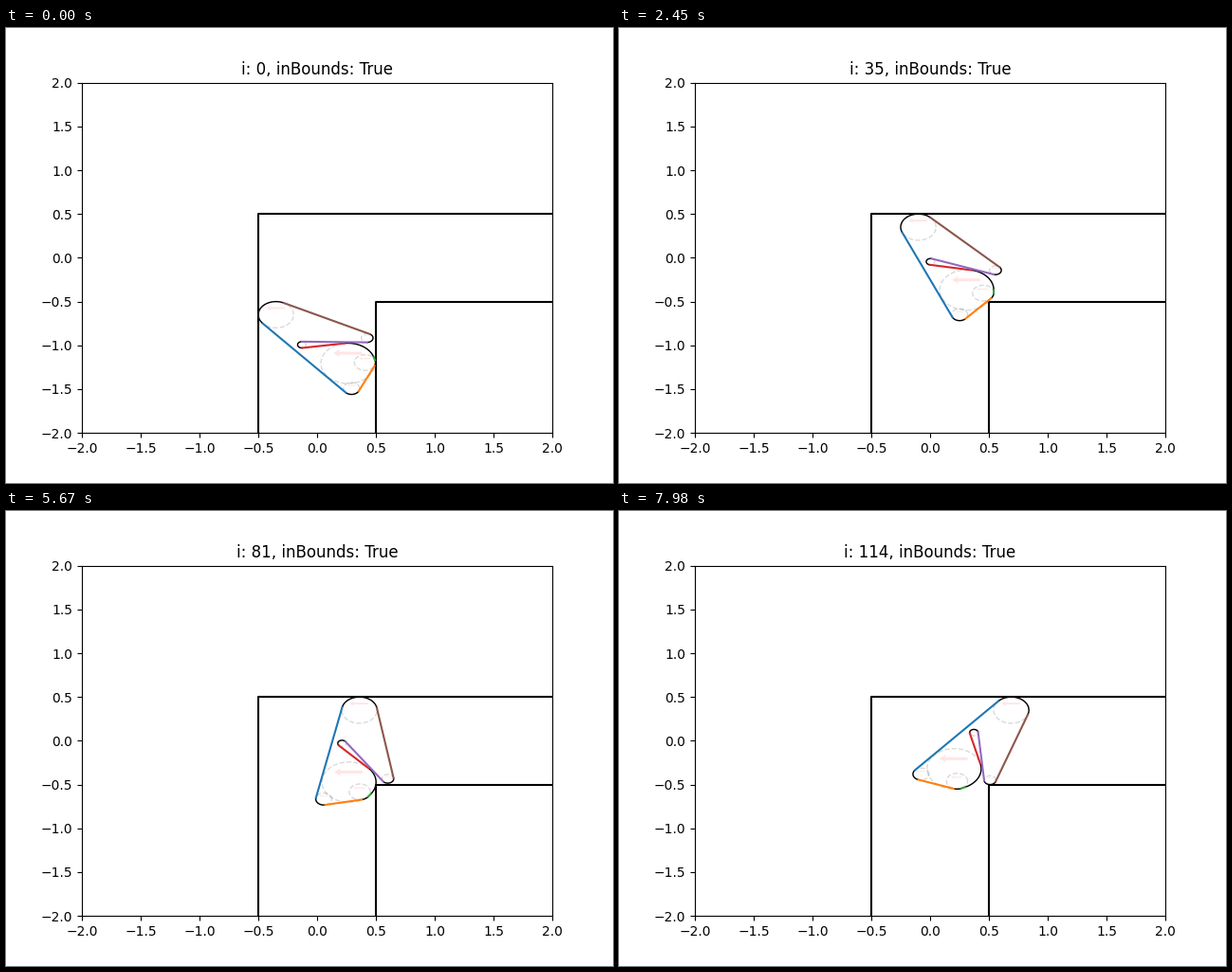
Recreate the animation shown at these times as a matplotlib script. Size 640 by 480 pixels, loop 8000 ms.

```python
import numpy as np
import matplotlib.pyplot as plt
from matplotlib.animation import FuncAnimation
from matplotlib.collections import LineCollection, PolyCollection

LOOP, STEP, HOLD = 8000, 20, 70
POSES = (LOOP - 1) // HOLD + 1
CORNER = np.array([0.5, -0.5])

# Discs relative to the first one; a negative radius turns the belt inwards.
DISCS = np.array([[0, 0], [0.643, -0.842], [0.757, -0.546],
                  [0.613, -0.555], [0.2204, -0.3433], [0.7758, -0.2656]])
RADII = np.array([0.15, 0.068, 0.09, 0.23, -0.036, 0.05])
COUNT = len(RADII)

# Left-pointing arrow for a disc of radius 1
ARROW = np.array([[0.5, 0.57], [-0.32, 0.57], [-0.32, 0.68], [-0.55, 0.5],
                  [-0.32, 0.32], [-0.32, 0.43], [0.5, 0.43]])
TURN = np.linspace(0, 2 * np.pi, 61)


def on_circle(angle):
    return np.column_stack([np.cos(angle), np.sin(angle)])


def place(pos, angle):
    c, s = np.cos(angle), np.sin(angle)
    return DISCS @ np.array([[c, s], [-s, c]]) + pos


def tangents(centers):
    """Start, end and outward normal of each straight side of the belt."""
    sides = []
    for k in range(COUNT):
        j = (k + 1) % COUNT
        d = centers[j] - centers[k]
        length = np.hypot(*d)
        u = d / length
        right = np.array([u[1], -u[0]])
        a = (RADII[k] - RADII[j]) / length
        n = a * u + np.sqrt(1 - a * a) * right
        sides.append((centers[k] + RADII[k] * n, centers[j] + RADII[j] * n, n))
    return sides


def in_bounds(centers):
    for (x, y), r in zip(centers, RADII):
        if r > 0 and np.hypot(max(0.5 - x, 0), max(y + 0.5, 0)) < r - 1e-9:
            return False
    for p, q, n in tangents(centers):
        along = (CORNER - p) @ (q - p)
        if 0 <= along <= (q - p) @ (q - p) and -0.1 < (CORNER - p) @ n < 0:
            return False
    return True


def plan():
    """Go up, then slide right, turning only as far as the corner demands."""
    poses, angle = [], 0.0
    for i in range(POSES):
        pos = np.array([-0.35 + 0.01 * max(0, i - 10),
                        -0.65 + 0.1 * min(i, 10)])
        while angle > -np.pi and not in_bounds(place(pos, angle)):
            angle -= np.radians(0.1)
        poses.append(place(pos, angle))
    return poses


def arcs(centers, sides):
    curves = []
    for k in range(COUNT):
        n0, n1 = sides[k - 1][2], sides[k][2]
        a0 = np.arctan2(n0[1], n0[0])
        sweep = (np.arctan2(n1[1], n1[0]) - a0) % (2 * np.pi)
        if RADII[k] < 0:
            sweep -= 2 * np.pi
        angle = a0 + np.linspace(0, sweep, 30)
        curves.append(centers[k] + RADII[k] * on_circle(angle))
    return curves


fig, ax = plt.subplots(figsize=(6.4, 4.8), dpi=100)
ax.set_xlim(-2, 2)
ax.set_ylim(-2, 2)
ax.plot([-0.5, -0.5, 2], [-2, 0.5, 0.5], "k")
ax.plot([0.5, 0.5, 2], [-2, -0.5, -0.5], "k")
title = ax.set_title("")

arrows = ax.add_collection(
    PolyCollection([], facecolor="red", edgecolor="none", alpha=0.1, zorder=1),
    autolim=False)
rings = ax.add_collection(
    LineCollection([], colors="black", linewidths=1, linestyles="--",
                   alpha=0.15, zorder=1), autolim=False)
bends = ax.add_collection(
    LineCollection([], colors="black", linewidths=1, zorder=1.5),
    autolim=False)
edges = ax.add_collection(
    LineCollection([], colors=[f"C{k}" for k in range(COUNT)],
                   linewidths=1.5, capstyle="projecting", zorder=2.5),
    autolim=False)

POSE_LIST = plan()


def draw(frame):
    i = min((frame * STEP + STEP // 2) // HOLD, POSES - 1)
    centers = POSE_LIST[i]
    sides = tangents(centers)
    sizes = np.abs(RADII)
    title.set_text(f"i: {i}, inBounds: True")
    arrows.set_verts([c + r * ARROW for c, r in zip(centers, sizes)])
    rings.set_segments([c + r * on_circle(TURN)
                        for c, r in zip(centers, sizes)])
    bends.set_segments(arcs(centers, sides))
    edges.set_segments([np.array([p, q]) for p, q, _ in sides])
    return title, arrows, rings, bends, edges


anim = FuncAnimation(fig, draw, frames=LOOP // STEP, interval=STEP,
                     repeat=True, repeat_delay=0, blit=False)
plt.show()
```
